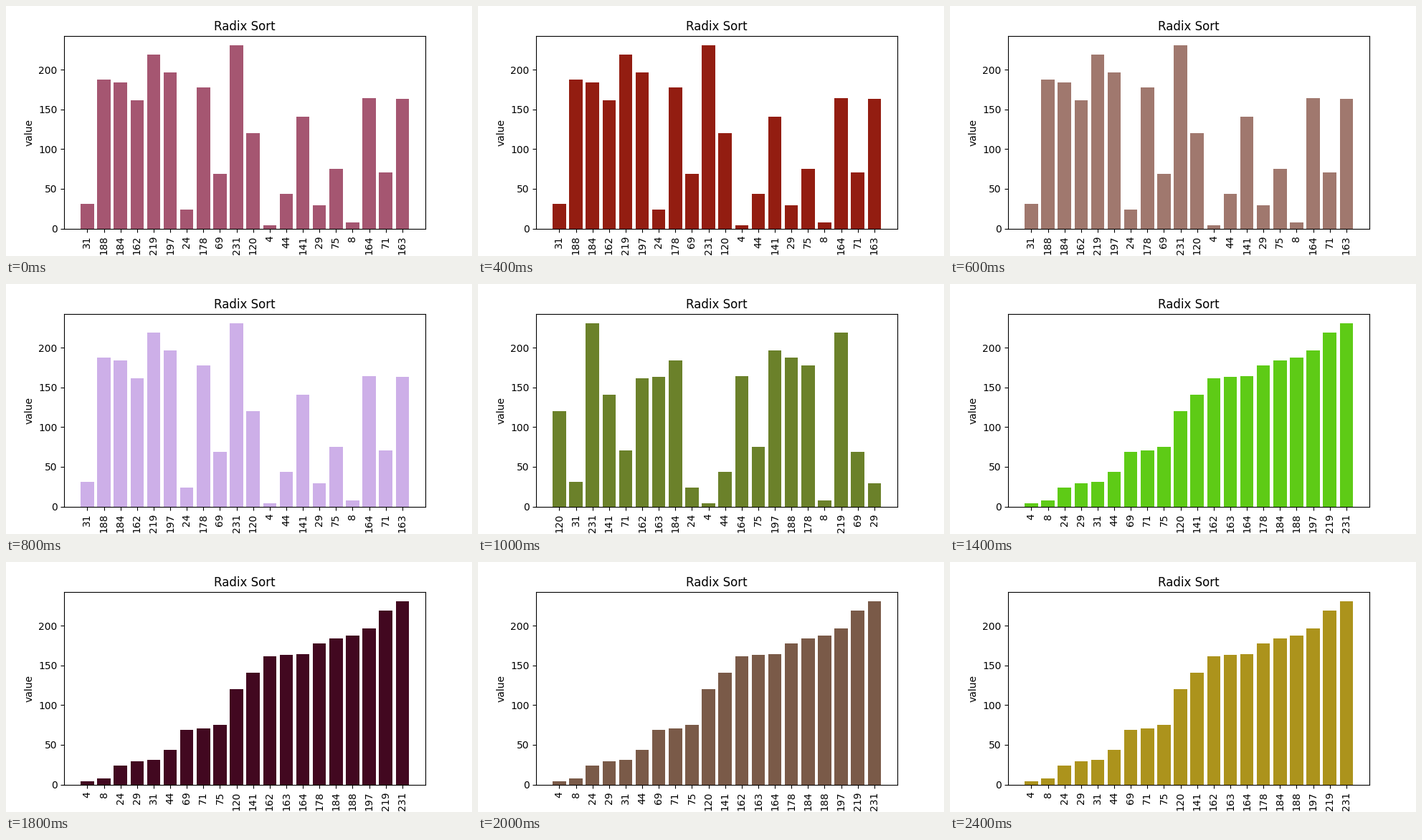
Animation of 650x350 px, one loop 2600 ms. Source, as a matplotlib script:

```python
import matplotlib.pyplot as plt
from matplotlib.animation import FuncAnimation

VALUES = [31, 188, 184, 162, 219, 197, 24, 178, 69, 231,
          120, 4, 44, 141, 29, 75, 8, 164, 71, 163]
COLORS = ["#a55671", "#8f6a5c", "#931d11", "#a0786e", "#cdafe8", "#6b812a", "#64a620",
          "#5ecb16", "#5c7a3a", "#420820", "#7a5a48", "#94783c", "#ac931c"]
FIRST_PASS = 5  # frame on which the ones digit has been sorted
FRAME_MS = 200


def radix_passes(values):
    """Return the list before sorting and after each digit pass."""
    states = [values]
    base = 1
    while base <= max(values):
        states.append(sorted(states[-1], key=lambda v: v // base % 10))
        base *= 10
    return states


STATES = radix_passes(VALUES)

fig, ax = plt.subplots(figsize=(6.5, 3.5), dpi=100)
positions = range(len(VALUES))
bars = ax.bar(positions, VALUES)
ax.set_title("Radix Sort")
ax.set_ylabel("value")


def update(frame):
    step = min(max(frame - FIRST_PASS + 1, 0), len(STATES) - 1)
    for bar, value in zip(bars, STATES[step]):
        bar.set_height(value)
        bar.set_facecolor(COLORS[frame])
    ax.set_xticks(positions, [str(v) for v in STATES[step]], rotation=90)
    return bars


anim = FuncAnimation(fig, update, frames=len(COLORS), interval=FRAME_MS,
                     init_func=lambda: update(0), repeat=True, repeat_delay=0)
plt.show()
```
